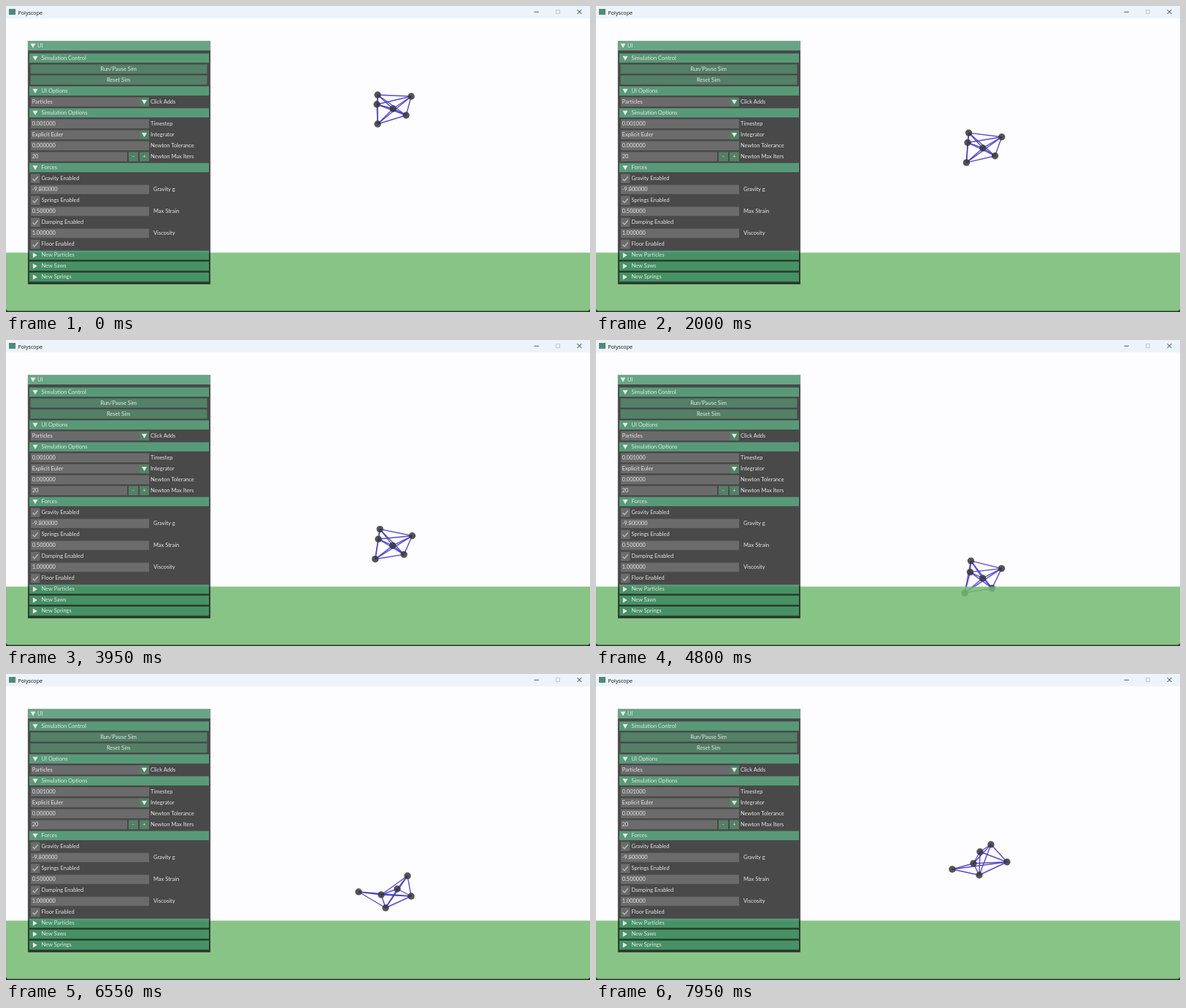
These frames come from a looping animation (800x420 px, 8000 ms). An HTML page with a canvas:

```html
<!DOCTYPE html>
<html lang="en">
<head>
<meta charset="utf-8">
<title>Spring simulation</title>
<style>
  html, body { margin: 0; width: 100%; height: 100%; overflow: hidden; background: #fdfcfe; }
  canvas { position: absolute; left: 0; top: 0; width: 800px; height: 420px; }
  span { position: absolute; white-space: pre; font: 7.5px/12px Lato, sans-serif; color: #e6e6e6; }
  span.mid { transform: translateX(-50%); }
  span.title { font-family: "Open Sans", "Noto Sans", sans-serif; font-size: 7.15px; color: #111; }
</style>
</head>
<body>
<canvas id="stage" width="800" height="420"></canvas>
<script>
const ctx = document.getElementById('stage').getContext('2d');
const LOOP = 8, STEP = 0.05;
const FLOOR = 338.5, CENTER_X = 526.6, HALF_G = 4.48;
const HIT = 4.5, LIFT = 5.95, OPEN = 6.55;
const TILT = 0.04, TUMBLE = Math.PI / 3;
const ROW = 12.6, PITCH = 15.03;
const HEADER = 'rgba(108,252,178,.45)';
const BUTTON = 'rgba(89,162,122,.62)';
const FRAME = 'rgba(161,161,161,.39)';
const LIGHT = '#e6e6e6';

// Body shapes, as particle offsets from the centre of mass.
const tight  = [[-17.5, -17], [28.5, -15], [-18.5, -4], [3.5, 2], [21.5, 11], [-17.5, 23]];
const loose  = [[-16.8, -20], [25.2, -17.5], [-13.5, -3.5], [3.3, 1], [17.5, 13], [-16.5, 27]];
const thrown = [[23.4, -23], [28.4, 5], [9.4, -5], [-12.6, 3], [-6.6, 21], [-43.6, -1]];
const folded = [[14.4, -22.7], [36.4, 1.3], [-0.6, -12.7], [-9.6, 3.3], [-1.6, 19.3], [-38.6, 11.3]];

const progress = (t, from, to) => Math.min(1, Math.max(0, (t - from) / (to - from)));
const smooth = u => u * u * (3 - 2 * u);
const lerp = (a, b, u) => a + (b - a) * u;
const mix = (p, q, u) => p.map(([x, y], i) => [lerp(x, q[i][0], u), lerp(y, q[i][1], u)]);
const turn = (pts, a) => pts.map(([x, y]) =>
  [x * Math.cos(a) - y * Math.sin(a), x * Math.sin(a) + y * Math.cos(a)]);

function hermite(a, b, va, vb, span, u) {
  const u2 = u * u, u3 = u2 * u;
  return lerp(a, b, smooth(u)) + span * (va * (u3 - 2 * u2 + u) + vb * (u3 - u2));
}

// Height of the centre of mass: free fall, springy floor contact, flight.
const throwY = (y, v, s) => y + v * s + HALF_G * s * s;
const dropY = t => throwY(139, 17.95, t);
const flyY = t => throwY(300, -37.2, t - OPEN);
function centerY(t) {
  if (t < HIT) return dropY(t);
  if (t > LIFT) return flyY(t);
  const vIn = 17.95 + 2 * HALF_G * HIT;
  const vOut = -37.2 + 2 * HALF_G * (LIFT - OPEN);
  return hermite(dropY(HIT), flyY(LIFT), vIn, vOut, LIFT - HIT, progress(t, HIT, LIFT));
}

// The body breathes and tilts while falling, tumbles off the floor, then folds.
function particles(t) {
  const breath = 0.5 - 0.5 * Math.cos(Math.PI * t) * Math.exp(-0.15 * t);
  const u = progress(t, 4.8, OPEN);
  const spin = TUMBLE * u;
  const falling = turn(mix(tight, loose, breath), TILT * Math.min(t, 4.8) + spin);
  const flying = turn(mix(thrown, folded, smooth(progress(t, OPEN, 7.95))), spin - TUMBLE);
  const stretch = 1 + 0.3 * Math.sin(Math.PI * progress(t, 5.2, OPEN)) ** 2;
  const y0 = centerY(t);
  return mix(falling, flying, smooth(u)).map(([x, y]) => [CENTER_X + x * stretch, y0 + y]);
}

// Springs of the last particle to 2 and 0 break at the stretch.
const snapped = (a, b, t) => b === 5 && (a === 2 && t > 5.9 || a === 0 && t > 6.1);

function box(x, y, w, h, fill) {
  ctx.fillStyle = fill;
  ctx.fillRect(x, y, w, h);
}
function path(pts, color, width) {
  ctx.beginPath();
  pts.forEach(([x, y]) => ctx.lineTo(x, y));
  if (width) {
    ctx.strokeStyle = color;
    ctx.lineWidth = width;
    ctx.stroke();
  } else {
    ctx.fillStyle = color;
    ctx.fill();
  }
}
function arrow(x, y, open) {
  path(open ? [[x - 3.6, y - 2.8], [x + 3.6, y - 2.8], [x, y + 3.4]]
            : [[x - 2.6, y - 3.6], [x + 3.4, y], [x - 2.6, y + 3.6]], LIGHT);
}

function drawBody(t) {
  const pts = particles(t);
  pts.forEach((p, a) => pts.forEach((q, b) => {
    if (b > a && !snapped(a, b, t)) path([p, q], 'rgba(68,58,196,.9)', 1.4);
  }));
  ctx.fillStyle = 'rgba(54,54,56,.85)';
  for (const [x, y] of pts) {
    ctx.beginPath();
    ctx.arc(x, y, 4.7, 0, 7);
    ctx.fill();
  }
}

function drawWindow() {
  box(0, 0, 800, 17, '#ecf3fa');
  box(4, 4, 9, 8, '#4f8a78');
  box(723.5, 7.8, 6.5, 0.8, '#333');
  ctx.strokeStyle = '#b9bec3';
  ctx.lineWidth = 0.8;
  ctx.strokeRect(753.4, 5.4, 5, 5);
  path([[782.5, 5], [788.5, 11]], '#222', 0.9);
  path([[788.5, 5], [782.5, 11]], '#222', 0.9);
}

function drawFloor() {
  box(0, FLOOR, 800, 420 - FLOOR, 'rgba(117,187,115,.85)');
  ctx.fillStyle = '#26382a';
  ctx.beginPath();
  ctx.rect(0, 400, 800, 20);
  ctx.roundRect(0, 400, 800, 18.6, [0, 0, 4, 4]);
  ctx.fill('evenodd');
}

const rowY = n => 71.5 + PITCH * n;
const rows = [
  ['header', 'Simulation Control'],
  ['button', 'Run/Pause Sim'],
  ['button', 'Reset Sim'],
  ['header', 'UI Options'],
  ['combo', 'Particles', 'Click Adds'],
  ['header', 'Simulation Options'],
  ['input', '0.001000', 'Timestep'],
  ['combo', 'Explicit Euler', 'Integrator'],
  ['input', '0.000000', 'Newton Tolerance'],
  ['stepper', '20', 'Newton Max Iters'],
  ['header', 'Forces'],
  ['check', 'Gravity Enabled'],
  ['input', '-9.800000', '  Gravity g'],
  ['check', 'Springs Enabled'],
  ['input', '0.500000', '  Max Strain'],
  ['check', 'Damping Enabled'],
  ['input', '1.000000', '  Viscosity'],
  ['check', 'Floor Enabled'],
  ['closed', 'New Particles'],
  ['closed', 'New Saws'],
  ['closed', 'New Springs']
];

const bar = (x, y, w, fill) => box(x, y - ROW / 2, w, ROW, fill);
const parts = {
  header(y) { bar(32, y, 246, HEADER); arrow(40, y, true); },
  closed(y) { bar(32, y, 246, HEADER); arrow(39.5, y, false); },
  button(y) { bar(33.5, y, 242, BUTTON); },
  input(y) { bar(34, y, 162, FRAME); },
  combo(y) {
    bar(34, y, 149, FRAME);
    bar(183, y, 13, BUTTON);
    arrow(189.5, y, true);
  },
  stepper(y) {
    bar(34, y, 132, FRAME);
    bar(168, y, 13, BUTTON);
    bar(183, y, 13, BUTTON);
  },
  check(y) {
    bar(34, y, 12.5, FRAME);
    path([[36.6, y + 0.4], [39, y + 3], [43.8, y - 2.6]], 'rgba(230,230,230,.6)', 1.5);
  }
};

function drawPanel() {
  box(30, 48, 250, 13, 'rgba(82,153,117,.87)');
  box(30, 61, 250, 321, 'rgba(0,0,0,.71)');
  ctx.strokeStyle = 'rgba(128,128,128,.5)';
  ctx.lineWidth = 0.6;
  ctx.strokeRect(30, 48, 250, 334);
  arrow(37, 54.3, true);
  rows.forEach(([kind], n) => parts[kind](rowY(n)));
}

function label(text, x, y, kind = '') {
  const el = document.createElement('span');
  el.textContent = text;
  el.className = kind;
  el.style.left = x + 'px';
  el.style.top = y - 5.7 + 'px';
  document.body.append(el);
}

function addLabels() {
  label('Polyscope', 16.5, 8.2, 'title');
  label('UI', 43, 54.5);
  rows.forEach(([kind, text, side], n) => {
    const y = rowY(n);
    if (kind === 'button') label(text, 154, y, 'mid');
    else label(text, /header|closed|check/.test(kind) ? 48.5 : 35.7, y);
    if (side) label(side.trim(), side.startsWith(' ') ? 202 : 198, y);
    if (kind === 'stepper') {
      label('-', 174.5, y, 'mid');
      label('+', 189.5, y, 'mid');
    }
  });
}

let start;
function frame(now) {
  start ??= now;
  const t = Math.floor((now - start) / 1000 % LOOP / STEP + 1e-6) * STEP;
  box(0, 0, 800, 420, '#fdfcfe');
  drawBody(t);
  drawFloor();
  drawWindow();
  drawPanel();
  requestAnimationFrame(frame);
}

addLabels();
requestAnimationFrame(frame);
</script>
</body>
</html>
```
